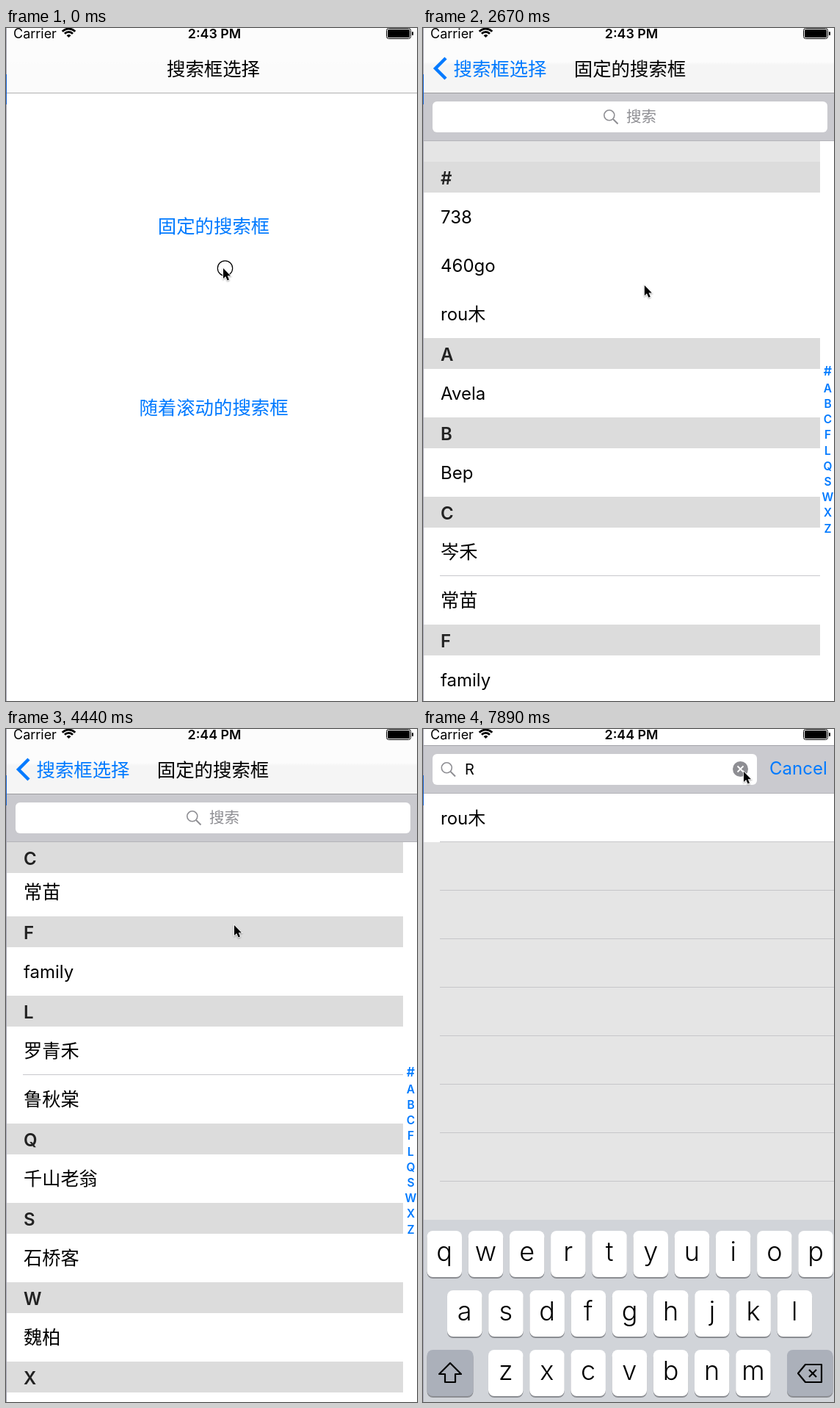
An HTML page with a canvas for the animation above (8000 ms loop, 560x916 px).

```html
<!DOCTYPE html>
<html lang="zh">
<head>
<meta charset="utf-8">
<style>
html, body { margin: 0; width: 560px; height: 916px; overflow: hidden; background: #fff; }
canvas { display: block; }
</style>
</head>
<body>
<canvas id="stage" width="560" height="916"></canvas>
<script>
const ctx = document.getElementById('stage').getContext('2d');
const W = 560, H = 916, LOOP = 8000, STEP = 148.6;
const FONT = 'Inter, "Noto Sans CJK SC", "Noto Sans CJK", sans-serif';
const BLUE = '#007aff', GREY = '#8e8e93';
const ROW = 66, HEAD = 42, LIST_W = 541;
const FOUND = 'rou木';

const sections = [
  ['#', '738', '460go', FOUND], ['A', 'Avela'], ['B', 'Bep'], ['C', '岑禾', '常苗'],
  ['F', 'family'], ['L', '罗青禾', '鲁秋棠'], ['Q', '千山老翁'], ['S', '石桥客'],
  ['W', '魏柏'], ['X', '许舟'], ['Z', '朱苇']
].map(([key, ...rows]) => ({ key, rows }));
let sum = 0;
for (const s of sections) {
  s.top = sum;
  sum += HEAD + s.rows.length * ROW;
  s.end = sum;
}

// [time, value...] key points
const cursorKeys = [
  [100, 296, 327], [440, 297, 277], [1800, 297, 277], [2220, 298, 366], [2520, 298, 385],
  [2970, 309, 284], [3120, 309, 284], [3715, 311, 267], [4400, 311, 267], [5190, 309, 115],
  [5700, 309, 115], [6390, 202, 690], [6900, 202, 690], [7430, 436, 212], [7850, 437, 58]
];
const scrollKeys = [
  [1800, 155], [2080, 167], [2225, 185], [2370, 196], [2560, 198], [2700, 178], [2960, 155],
  [3125, 155], [3270, 110], [3715, -142], [3860, -240], [4010, -322], [4160, -367],
  [4310, -375], [4600, -379]
];

const clamp = v => Math.max(0, Math.min(1, v));
const ramp = (t, a, b) => clamp((t - a) / (b - a));
const lerp = (a, b, p) => a + (b - a) * p;
const easeOut = p => 1 - (1 - p) ** 3;
const smooth = p => p * p * (3 - 2 * p);

function along(keys, t) {
  const i = keys.findIndex(k => k[0] > t);
  if (i === 0) return keys[0].slice(1);
  if (i < 0) return keys[keys.length - 1].slice(1);
  const a = keys[i - 1], b = keys[i], p = ramp(t, a[0], b[0]);
  return a.slice(1).map((v, n) => lerp(v, b[n + 1], p));
}

function rect(x, y, w, h, color) {
  ctx.fillStyle = color;
  ctx.fillRect(x, y, w, h);
}

function round(x, y, w, h, r, color) {
  ctx.fillStyle = color;
  ctx.beginPath();
  ctx.roundRect(x, y, w, h, r);
  ctx.fill();
}

function text(str, x, y, size, { color = '#000', weight = 400, align = 'left' } = {}) {
  ctx.font = `${weight} ${size}px ${FONT}`;
  ctx.fillStyle = color;
  ctx.textAlign = align;
  ctx.fillText(str, x, y);
}

function poly(points, close) {
  ctx.beginPath();
  points.forEach(([x, y]) => ctx.lineTo(x, y));
  if (close) ctx.closePath();
}

function stroke(color, width) {
  ctx.strokeStyle = color;
  ctx.lineWidth = width;
  ctx.stroke();
}

function fade(alpha, draw) {
  if (alpha <= 0) return;
  ctx.save();
  ctx.globalAlpha *= alpha;
  draw();
  ctx.restore();
}

function statusBar(t) {
  text('Carrier', 10, 14, 18);
  text(t < 3100 ? '2:43 PM' : '2:44 PM', 284, 14, 17.8, { weight: 600, align: 'center' });
  ctx.lineCap = 'butt';
  for (const [r, w] of [[12, 2.8], [7.6, 2.8], [2, 4]]) {
    ctx.beginPath();
    ctx.arc(85.5, 13, r, -Math.PI * 0.76, -Math.PI * 0.24);
    stroke('#000', w);
  }
  ctx.beginPath();
  ctx.roundRect(518.5, 0.5, 33, 14, 3);
  stroke('#000', 1);
  round(520, 2, 30, 11, 1.5, '#000');
  round(553, 5, 2, 5, 1, '#000');
}

function home(t) {
  rect(0, 89, W, H - 89, '#fff');
  const opts = { color: BLUE, align: 'center' };
  fade(t > 880 ? 0.3 : 1, () => text('固定的搜索框', 283, 278.5, 25.4, opts));
  text('随着滚动的搜索框', 283, 525.5, 25.4, opts);
}

function navBar(push, lift, labels) {
  const bottom = 88 - 66 * lift;
  const g = ctx.createLinearGradient(0, 46, 0, 50);
  g.addColorStop(0, '#fcfcfc');
  g.addColorStop(1, push > 0 ? '#f5f5f5' : '#fbfbfb');
  rect(0, 0, W, bottom, lift > 0 ? '#fff' : g);
  if (!labels) return;
  rect(0, 88, W, 1, push > 0 ? '#9c9c9f' : '#b0b0b0');
  const title = { weight: 500, align: 'center' };
  const x = lerp(282.5, 105, push);
  fade(1 - push, () => text('搜索框选择', x, 64.5, 25.4, title));
  fade(push, () => {
    text('搜索框选择', x, 64.5, 25.4, { color: BLUE, align: 'center' });
    poly([[31, 41], [17, 55], [31, 69]]);
    stroke(BLUE, 4.4);
    text('固定的搜索框', lerp(520, 282, push), 64.5, 25.4, title);
  });
}

function list(origin, bar, clipTop, hairline) {
  const pin = bar + 66;
  ctx.save();
  ctx.beginPath();
  ctx.rect(0, clipTop, W, H - clipTop);
  ctx.clip();
  rect(0, 0, W, H, '#fff');
  rect(0, 0, LIST_W, H, '#e5e5e5');
  rect(0, 0, W, bar, '#e5e5e5');
  for (const s of sections) {
    s.rows.forEach((name, i) => {
      const y = origin + s.top + HEAD + i * ROW;
      if (y > H || y < -ROW) return;
      rect(0, y, W, ROW, '#fff');
      text(name, 24, y + 41.5, /^[\u4e00-\u9fff]/.test(name) ? 25.2 : 24);
      if (i && (s.key === 'C' || (s.key === 'L' && hairline))) {
        rect(23, y - 1, LIST_W - 23, 1, '#c8c8cc');
      }
    });
  }
  for (const s of sections) {
    const y = Math.min(Math.max(origin + s.top, pin), origin + s.end - HEAD);
    if (y > H || y < -HEAD) continue;
    rect(0, y, y < bar ? W : LIST_W, HEAD, '#dcdcdc');
    text(s.key, 24, y + 31, 24, { weight: 600, color: '#222' });
  }
  ctx.restore();
}

function indexColumn(mid, gap) {
  sections.forEach((s, i) => {
    const y = mid + (i - 5) * gap - (i ? 0 : 1.5);
    text(s.key, 551.5, y + 5.5, i ? 15.5 : 17.5, { weight: 600, color: BLUE, align: 'center' });
  });
}

function magnifier(x, y) {
  ctx.beginPath();
  ctx.arc(x - 2.2, y - 2.2, 7, 0, 7);
  stroke(GREY, 1.6);
  poly([[x + 3, y + 3], [x + 9.5, y + 9.5]]);
  stroke(GREY, 2);
}

function searchBar(y, t, typed) {
  const open = ramp(t, 5400, 5600), left = smooth(ramp(t, 5660, 5950));
  rect(0, y, W, 66, t > 5480 ? 'rgba(201,201,206,.965)' : '#c9c9ce');
  rect(0, y, W, 1, '#a4a4a9');
  rect(0, y + 65, W, 1, '#b4b4b9');
  round(13, y + 12, lerp(538, 442, open), 42, 6, '#fff');
  magnifier(lerp(256, 34.5, left), y + 33);
  let caretX = 55, since = t - 5640;
  if (typed) {
    text('R', 57, y + 40, 20);
    caretX = 58 + ctx.measureText('R').width;
    since = t - 6930;
    ctx.beginPath();
    ctx.arc(432.5, y + 32.5, 10.5, 0, 7);
    ctx.fillStyle = GREY;
    ctx.fill();
    for (const d of [-4, 4]) {
      poly([[432.5 - 4, y + 32.5 - d], [432.5 + 4, y + 32.5 + d]]);
      stroke('#fff', 1.8);
    }
  } else {
    text('搜索', lerp(277, 57, left), y + 40, 20.5, { color: GREY });
  }
  if (since >= 0) {
    fade(1 - ramp(since % 1000, 600, 945), () => rect(caretX, y + 18, 3, 27, '#4a62ea'));
  }
  fade(open, () => text('Cancel', lerp(520, 472, open), y + 40, 24, { color: BLUE }));
}

function results() {
  rect(0, 88, W, H, '#e5e5e5');
  rect(0, 88, W, 66, '#fff');
  text(FOUND, 24, 129.5, 24);
  for (let y = 153; y < 668; y += ROW) rect(23, y, W - 23, 1, '#c6c6c9');
}

function key(x, y, w, color = '#fff') {
  round(x, y + 2, w, 63, 8, '#8b8d92');
  round(x, y, w, 63, 8, color);
}

function keyboard(y, lower) {
  const dark = '#abb0ba', pitch = 56.2;
  rect(0, y, W, H - y, '#d1d4d9');
  [['QWERTYUIOP', 5.5], ['ASDFGHJKL', 33], ['ZXCVBNM', 89]].forEach(([chars, x0], r) => {
    const top = y + 15 + r * 81;
    [...chars].forEach((c, i) => {
      const x = x0 + i * pitch;
      key(x, top, 47.5);
      text(lower ? c.toLowerCase() : c, x + 23.7, top + (lower ? 41 : 44), lower ? 36 : 33,
        { align: 'center', weight: lower ? 300 : 400 });
    });
  });
  const top = y + 177;
  key(5.5, top, 63, lower ? dark : '#fff');
  key(496, top, 62.5, dark);
  ctx.lineJoin = 'round';
  const cy = top + 32;
  poly([[37, cy - 14], [52, cy + 1], [44, cy + 1], [44, cy + 12],
        [30, cy + 12], [30, cy + 1], [22, cy + 1]], true);
  if (!lower) {
    ctx.fillStyle = '#000';
    ctx.fill();
  }
  stroke('#000', 2.2);
  poly([[511, cy], [521, cy - 12], [543, cy - 12], [543, cy + 12], [521, cy + 12]], true);
  stroke('#000', 2.2);
  for (const d of [-5, 5]) {
    poly([[526, cy - d], [536, cy + d]]);
    stroke('#000', 2.2);
  }
  ctx.lineJoin = 'miter';
}

function pointer(t) {
  const [x, y] = along(cursorKeys, t);
  if (t < 2600 || (t > 6820 && t < 6950)) {
    ctx.beginPath();
    ctx.arc(x + 2.5, y, 10.2, 0, 7);
    stroke('#000', 1.2);
  }
  ctx.save();
  ctx.translate(x, y);
  poly([[0, 0], [0, 14], [3.2, 11], [5.6, 16.5], [8, 15.5], [5.7, 10.2], [10, 10.2]], true);
  ctx.shadowColor = 'rgba(0,0,0,.35)';
  ctx.shadowBlur = 2;
  ctx.shadowOffsetY = 1;
  stroke('#fff', 1.6);
  ctx.shadowColor = 'transparent';
  ctx.fillStyle = '#000';
  ctx.fill();
  ctx.restore();
}

function draw(t) {
  const push = easeOut(ramp(t, 1100, 1620));
  const lift = ramp(t, 5490, 5835);
  const rise = smooth(ramp(t, 5660, 6000));
  const keys = easeOut(ramp(t, 5680, 6120));
  const typed = t > 6960;
  const bar = 88 - 66 * rise;

  rect(0, 0, W, H, '#fff');
  if (push < 1) {
    ctx.save();
    ctx.translate(-170 * push, 0);
    home(t);
    ctx.restore();
  }
  if (push > 0) {
    ctx.save();
    ctx.translate(W * (1 - push), 0);
    if (typed) {
      results();
    } else {
      const origin = Math.round(along(scrollKeys, t)[0] - 66 * rise);
      list(origin, bar, 88 - 66 * lift, t > 4300 && t < 5750);
      const tight = t > 5480 && t < 5780;
      indexColumn(575 - 33 * rise, tight ? 19.65 : 21.2);
    }
    searchBar(bar, t, typed);
    ctx.restore();
  }
  navBar(push, lift, t < 5480);
  statusBar(t);
  if (keys > 0) keyboard(lerp(H, 668, keys), typed);
  rect(0, 0, 1, H, '#a9a9b6');
  rect(0, 63, 1, 41, '#1b66d6');
  pointer(t);
}

function tick(now) {
  draw(Math.floor((now % LOOP + 10) / STEP) * STEP);
  requestAnimationFrame(tick);
}
requestAnimationFrame(tick);
</script>
</body>
</html>
```
